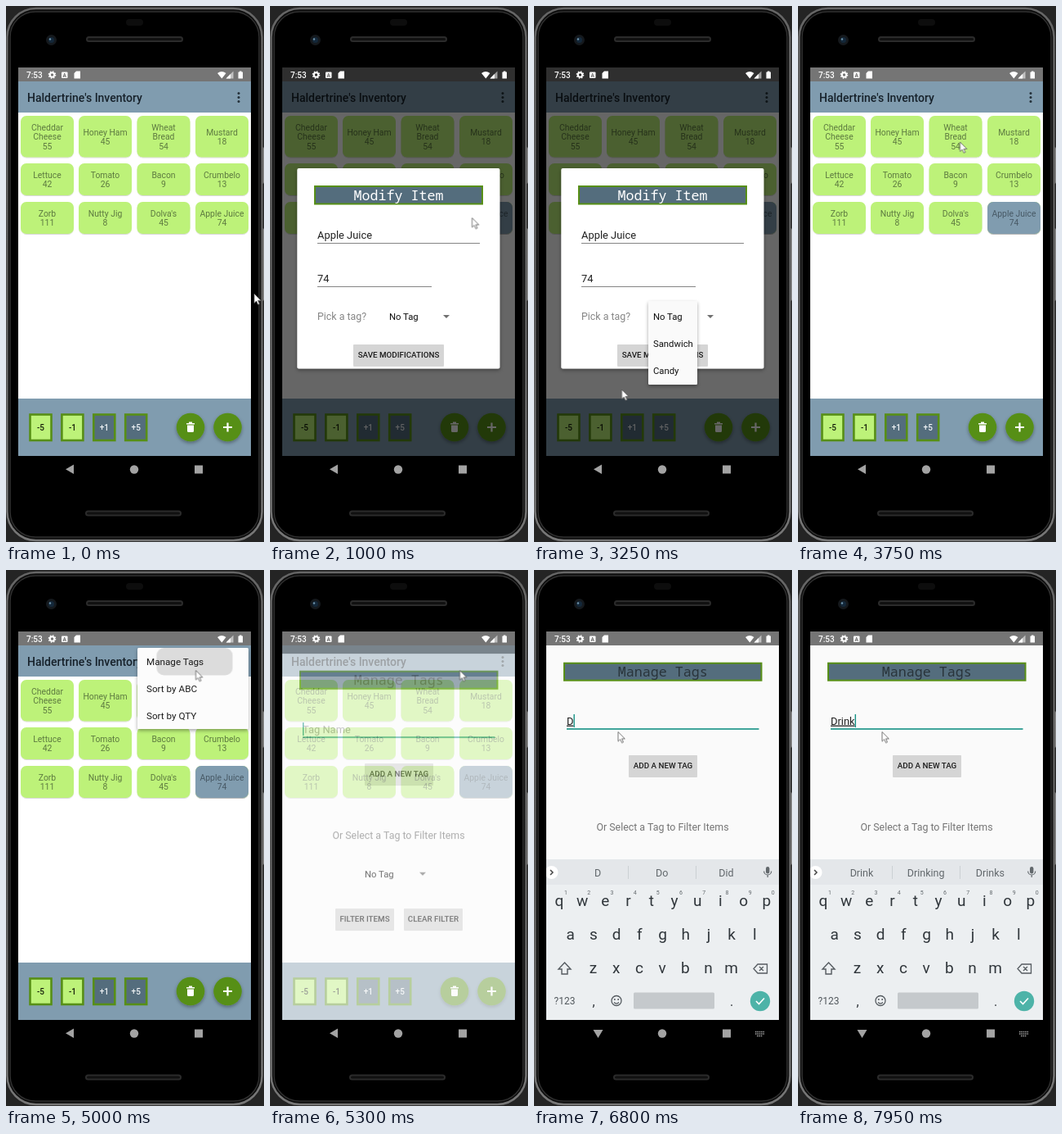
These frames come from a looping animation (316x654 px, 8 s). An HTML page:

```html
<!DOCTYPE html>
<html lang="en">
<head>
<meta charset="utf-8">
<title>Inventory app</title>
<style>
html, body { margin: 0; width: 100%; height: 100%; overflow: hidden; background: #242424; }
svg { display: block; width: 316px; height: 654px; font-family: Roboto, sans-serif; }
.mono { font-family: "Noto Sans Mono", monospace; }
.loop { animation: 8s linear infinite both; }
.step { animation: 8s step-end infinite both; }
#pointer { animation-name: pointer; animation-timing-function: ease-in-out; }
#selected { animation-name: selected; }
#dim, #dialog { animation-name: dialog; }
#dropdown { animation-name: dropdown; }
#menu { animation-name: menu; transform-origin: 297px 95px; }
#ripple { animation-name: ripple; transform-origin: 231px 112px; }
#page { animation-name: page; }
#keyboard { animation-name: keyboard; }
#navShade { animation-name: navShade; }
#navBack { animation-name: navBack; }
#navDown { animation-name: navDown; }
@keyframes pointer {
  0%, .6% { transform: translate(304px, 351px); }
  5% { transform: translate(258px, 262px); }
  10%, 13.75% { transform: translate(247.5px, 258.5px); }
  18.75%, 23.75% { transform: translate(192px, 376px); }
  31.8%, 42.5% { transform: translate(107.5px, 468px); }
  46.8%, 47.5% { transform: translate(198.5px, 166px); }
  53.75%, 58% { transform: translate(285px, 108px); }
  61.25%, 66.25% { transform: translate(232.500px, 122.500px); }
  71.25%, 100% { transform: translate(103px, 197.500px); }
}
@keyframes selected { 0% { opacity: 0; } 6.25%, 100% { opacity: 1; } }
@keyframes dialog { 0%, 10.2% { opacity: 0; } 12%, 43.4% { opacity: 1; } 45%, 100% { opacity: 0; } }
@keyframes dropdown { 0%, 22% { opacity: 0; } 23.5%, 40.8% { opacity: 1; } 41.9%, 100% { opacity: 0; } }
@keyframes menu {
  0%, 55% { opacity: 0; transform: scale(.6, .3); }
  57%, 63.75% { opacity: 1; transform: none; }
  65%, 100% { opacity: 0; transform: none; }
}
@keyframes ripple {
  0%, 61.8% { opacity: 0; transform: scaleX(.2); }
  61.9% { opacity: 1; transform: scaleX(.3); }
  62.5% { opacity: 1; transform: none; }
  63.2%, 100% { opacity: 1; transform: scaleX(1.7); }
}
@keyframes page {
  0%, 65% { opacity: 0; transform: translateY(25px); animation-timing-function: ease-out; }
  68%, 100% { opacity: 1; transform: none; }
}
@keyframes keyboard {
  0%, 74.24% { opacity: 0; transform: translateY(20px); }
  74.25% { opacity: .82; transform: translateY(20px); animation-timing-function: ease-out; }
  76.75%, 100% { opacity: 1; transform: none; }
}
@keyframes navShade { 0%, 74.24% { opacity: 1; } 74.25% { opacity: .27; } 76.75%, 100% { opacity: 1; } }
@keyframes navBack { 0% { opacity: 1; } 74.25%, 100% { opacity: 0; } }
@keyframes navDown { 0% { opacity: 0; } 74.25%, 100% { opacity: 1; } }
</style>
</head>
<body>
<svg id="stage" viewBox="0 0 316 654"></svg>
<script>
const LIME = '#bdf279', GREEN = '#578f16', STEEL = '#809caf', SLATE = '#546d7d', TEAL = '#159184';

const text = (x, y, str, size, fill, more = '') =>
  `<text x="${x}" y="${y + size * .355}" font-size="${size}" fill="${fill}" ${more}>${str}</text>`;
const MID = 'text-anchor="middle"', BOLD = 'font-weight="500"';
const centered = (x, y, str, size, fill, more = '') => text(x, y, str, size, fill, `${MID} ${more}`);
const box = (x, y, w, h, fill, more = '') =>
  `<rect x="${x}" y="${y}" width="${w}" height="${h}" fill="${fill}" ${more}/>`;
const path = (d, fill, more = '') => `<path d="${d}" fill="${fill}" ${more}/>`;
const line = (d, color, width = 1, more = '') => path(d, 'none', `stroke="${color}" stroke-width="${width}" ${more}`);
const dot = (x, y, r, fill, more = '') => `<circle cx="${x}" cy="${y}" r="${r}" fill="${fill}" ${more}/>`;
const layer = (id, body, kind = 'loop') => `<g id="${id}" class="${kind}">${body}</g>`;
const caret = (x, y) => path(`M${x - 4} ${y - 2}h8l-4 4z`, '#707070');
const banner = (x, y, w, h, str, fill) =>
  box(x + 1, y + 1, w - 2, h - 2, SLATE, `stroke="${GREEN}" stroke-width="2"`) +
  centered(x + w / 2, y + h / 2 + .3, str, 16.7, fill, 'class="mono"');
const button = (x, y, w, h, str) =>
  box(x, y, w, h, '#d5d5d5', 'rx="1" filter="url(#soft)"') +
  centered(x + w / 2, y + h / 2, str, 9.8, '#1c1c1c', BOLD);

// Phone body
function phone() {
  return box(0, 0, 316, 654, '#242424') +
    box(311, 172, 5, 45, '#858585', 'rx="2"') + box(311, 271, 5, 89, '#858585', 'rx="2"') +
    box(1.5, 3, 312, 649, '#0c0c0c', 'rx="35" stroke="url(#rim)" stroke-width="2.5"') +
    box(5, 7, 305, 641, '#000', 'rx="31" stroke="#303030" stroke-width="1.5"') +
    box(147, 16, 21, 8, '#0d0d0d', 'rx="4"') +
    dot(55.5, 41.5, 6.5, '#15191d') + dot(55.5, 41.5, 3.5, '#14283a') + dot(54, 40.5, 1.2, '#6f93a8') +
    box(98, 37, 119, 7, '#2b2b2b', 'rx="3.5"') + box(100, 39, 115, 3, '#111', 'rx="1.5"') +
    box(97, 615.5, 118, 7, '#2b2b2b', 'rx="3.5"') + box(99, 617.5, 114, 3, '#111', 'rx="1.5"');
}

// Inventory grid
const columns = [18, 89, 160.5, 232];
const rows = [[134, 50.5], [192, 39], [239, 39]];
const items = [
  ['Cheddar', 'Cheese', 55], ['Honey Ham', 45], ['Wheat', 'Bread', 54], ['Mustard', 18],
  ['Lettuce', 42], ['Tomato', 26], ['Bacon', 9], ['Crumbelo', 13],
  ['Zorb', 111], ['Nutty Jig', 8], ["Dolva's", 45], ['Apple Juice', 74]
];
function cell(lines, i, fill, ink) {
  const x = columns[i % 4], [y, h] = rows[i >> 2];
  const top = y + h / 2 - (lines.length - 1) * 5.7 + .3;
  return box(x, y, 65, h, fill, 'rx="7" filter="url(#soft)"') +
    lines.map((s, k) => centered(x + 32.5, top + k * 11.4, s, 10.4, ink)).join('');
}
function inventory() {
  const steps = ['-5', '-1', '+1', '+5'].map((label, i) => {
    const light = i < 2;
    return box(29.5 + i * 38.9, 498.5, 26, 31.5, light ? LIME : SLATE, `stroke="${GREEN}" stroke-width="2.6"`) +
      centered(42.5 + i * 38.9, 514.5, label, 10, light ? '#16200a' : '#eef2f4', BOLD);
  }).join('');
  const fabs = [226, 271.5].map(x => dot(x, 514, 17.3, GREEN, 'filter="url(#shadow)"')).join('');
  return box(15, 75, 285, 474, '#fff') + box(15, 75, 285, 17, '#757575') + box(15, 92, 285, 38, STEEL) +
    text(26, 112, "Haldertrine's Inventory", 14, '#16212a', BOLD) +
    [106.5, 111.5, 116.5].map(y => dot(285, y, 1.5, '#24313a')).join('') +
    items.map((item, i) => cell(item, i, LIME, '#5d7a40')).join('') +
    layer('selected', cell(items[11], 11, STEEL, '#475965'), 'step') +
    box(15, 479, 285, 70, STEEL) + steps + fabs +
    path('M221 509h10v1.6h-10zM224 507.5h4v2h-4zM222 511.5h8v7q0 1.5-1.5 1.5h-5q-1.5 0-1.5-1.5z', '#fff') +
    line('M271.5 508.5v11M266 514h11', '#fff', 2.2);
}

function dialog() {
  return box(33.3, 198, 248.2, 244.5, '#fff', 'rx="2" filter="url(#shadow)"') +
    banner(54, 219, 207, 23.5, 'Modify Item', '#fff') +
    text(58, 279.5, 'Apple Juice', 12.9, '#222') + line('M58 289.5h199', '#858585') +
    text(58, 332.5, '74', 12.9, '#222') + line('M58 342.5h140', '#858585') +
    text(58, 379, 'Pick a tag?', 12.4, '#858585') +
    text(146, 379, 'No Tag', 11.3, '#111') + caret(216, 379) +
    button(102, 413, 111, 26, 'SAVE MODIFICATIONS');
}
function dropdown() {
  return box(140, 360, 60, 102, '#fafafa', 'rx="1.5" filter="url(#shadow)"') +
    ['No Tag', 'Sandwich', 'Candy'].map((s, i) => text(146, 379 + i * 33.2, s, 11.3, '#111')).join('');
}
function menu() {
  return box(161, 95, 136, 99, '#fcfcfc', 'rx="1.5" filter="url(#shadow)"') +
    `<g clip-path="url(#firstItem)">${layer('ripple', box(185, 95, 92, 33.5, '#dcdcdc', 'rx="9"'))}</g>` +
    ['Manage Tags', 'Sort by ABC', 'Sort by QTY'].map((s, i) => text(172, 111.7 + i * 33.2, s, 11.7, '#1c1c1c')).join('');
}

// Typed word with the suggestions that go with it
const typing = [
  [0, '', 'thanks', 'I', 'we'],
  [6550, 'D', 'D', 'Do', 'Did'],
  [6850, 'Dr', 'Dr', 'Drive', 'Dr.'],
  [7100, 'Dri', 'Dri', 'Drive', 'Drink'],
  [7400, 'Drin', 'Drin', 'Drink', 'Drinking'],
  [7700, 'Drink', 'Drink', 'Drinking', 'Drinks']
];
const staged = draw => typing.map((stage, i) =>
  `<g class="step" style="animation-name:stage${i}">${draw(stage)}</g>`).join('');

function page() {
  return box(15, 75, 285, 474, '#fafafa') + box(15, 75, 285, 17, '#757575') +
    banner(36, 112.7, 243.5, 23, 'Manage Tags', '#29343b') +
    staged(([, word]) => (word
      ? text(40, 184, word, 12.9, '#222', 'class="typed" text-decoration="underline"')
      : text(40, 184, 'Tag Name', 12.9, '#9a9a9a')) +
      box(40, 176, 1.4, 16, TEAL, 'class="bar"')) +
    box(40, 193.2, 235.5, 1.6, TEAL) +
    button(116, 226, 84, 26, 'ADD A NEW TAG') +
    centered(157.5, 314, 'Or Select a Tag to Filter Items', 12.4, '#757575') +
    text(116, 360.7, 'No Tag', 11.3, '#111') + caret(187, 360.7) +
    button(80, 403, 72, 26, 'FILTER ITEMS') + button(164, 403, 72, 26, 'CLEAR FILTER');
}

function keyboard() {
  const ink = '#30363b';
  const keys = (letters, x, y) => [...letters].map((c, i) => centered(x + i * 28.2, y, c, 19, ink)).join('');
  const digits = [...'1234567890'].map((d, i) => centered(39 + i * 28.2, 394, d, 7, '#62686c')).join('');
  return box(15, 353, 285, 196, '#eceff1') + box(15, 353, 285, 31, '#e4e7ea') +
    dot(21.5, 369, 8, '#fff') + line('M20 366l3 3-3 3', '#444', 1.5) +
    line('M115.5 361v16M198.5 361v16', '#cbd0d3') +
    staged(([, , ...words]) => words.map((w, i) => centered(78 + i * 78.7, 369.5, w, 12.5, '#62686c')).join('')) +
    box(284, 362, 4.4, 8.5, '#62686c', 'rx="2.2"') + line('M281.7 367.5a4.5 4.5 0 0 0 9 0M286.2 372v3', '#62686c', 1.2) +
    keys('qwertyuiop', 31, 403.5) + digits + keys('asdfghjkl', 44.7, 444) + keys('zxcvbnm', 72.5, 485) +
    line('M37.5 479l7.5 8h-4v6h-7v-6h-4z', '#555b60', 1.4) +
    line('M274 481h11.5v11h-11.5l-5-5.5zM276 484l5 5m0-5l-5 5', '#555b60', 1.3) +
    centered(37.5, 525.5, '?123', 12, '#50565b') + centered(73, 526, ',', 16, ink) + centered(242, 526, '.', 16, ink) +
    dot(101, 525.5, 6, 'none', 'stroke="#555b60" stroke-width="1.3"') +
    dot(98.8, 524, 1, '#555b60') + dot(103.2, 524, 1, '#555b60') + line('M98 527.5q3 3 6 0', '#555b60', 1.2) +
    box(122, 515.5, 99, 20, '#c5c9cc', 'rx="1.5"') +
    dot(277, 526, 12.2, '#4db3a8') + line('M272 526l3.5 3.5 6.5-7', '#fff', 1.6);
}

function statusIcons() {
  return text(25, 84.2, '7:53', 10, '#fff', BOLD) +
    dot(56.5, 84, 2.7, 'none', 'stroke="#fff" stroke-width="2"') +
    dot(56.5, 84, 4.2, 'none', 'stroke="#fff" stroke-width="1.2" stroke-dasharray="1.6 1.7"') +
    box(68, 80.5, 7.5, 7.5, '#fff', 'rx="1"') + centered(71.8, 84.4, 'A', 6.5, '#666', 'font-weight="700"') +
    path('M86 79.5h5v9h-7.5v-6.5z', '#fff') +
    path('M259 82q5-4 10.5 0l-5.2 6.5z', '#fff') + path('M278.5 79.5v9h-9z', '#fff', 'fill-opacity=".55"') +
    path('M275 83v5.5h-5.5z', '#fff') +
    path('M284.5 80.5h1.5v-1h2.5v1h1.5v8h-5.5z', '#fff');
}

function navigation() {
  const gray = '#a3a3a3';
  return layer('navShade', box(15, 549, 285, 32, '#000')) +
    layer('navBack', path('M83 559.5v11.5l-10-5.7z', gray), 'step') +
    layer('navDown', path('M72.5 561h12l-6 10z', gray) +
      line('M271 563.5h11M271 566h11M273 568.5h7', gray, 1.3, 'stroke-dasharray="1.5 .9"'), 'step') +
    dot(157, 565.5, 5.2, gray) + box(231, 560.5, 10, 10, gray);
}

const defs = `<defs>
  <linearGradient id="rim" x2="0" y2="1"><stop stop-color="#666"/><stop offset=".5" stop-color="#5c5c5c"/><stop offset="1" stop-color="#777"/></linearGradient>
  <filter id="soft"><feDropShadow dx="0" dy=".7" stdDeviation=".7" flood-opacity=".22"/></filter>
  <filter id="shadow" x="-20%" y="-20%" width="140%" height="150%"><feDropShadow dx="0" dy="2" stdDeviation="2" flood-opacity=".35"/></filter>
  <clipPath id="firstItem"><rect x="161" y="95" width="136" height="33.5"/></clipPath>
  <clipPath id="screen"><rect x="15" y="75" width="285" height="474"/></clipPath>
  <clipPath id="display"><rect x="15" y="75" width="285" height="492.500"/></clipPath>
</defs>`;

const stage = document.getElementById('stage');
stage.innerHTML = defs + phone() + inventory() +
  layer('dim', box(15, 75, 285, 474, '#000', 'fill-opacity=".6"')) +
  layer('dialog', dialog()) + layer('dropdown', dropdown()) + layer('menu', menu()) +
  `<g clip-path="url(#screen)">${layer('page', page())}</g>` +
  `<g clip-path="url(#display)">${layer('keyboard', keyboard())}</g>` +
  statusIcons() + navigation() +
  layer('pointer', path('M0 0v11.5l2.7-2.4 1.9 4.2 1.9-.8-1.9-4.1h3.7z', '#fff', 'stroke="#555" stroke-width=".8"'));

// Put the text bar after each typed word
for (const word of stage.querySelectorAll('.typed'))
  word.parentNode.querySelector('.bar').setAttribute('x', 40 + word.getComputedTextLength());

const rules = document.createElement('style');
rules.textContent = typing.map(([start], i) => {
  const end = typing[i + 1]?.[0] ?? 8000;
  const before = start ? '0% { opacity: 0; }' : '';
  const after = end < 8000 ? `${end / 80}%, 100% { opacity: 0; }` : '100% { opacity: 1; }';
  return `@keyframes stage${i} { ${before} ${start / 80}% { opacity: 1; } ${after} }`;
}).join('\n');
document.head.append(rules);
</script>
</body>
</html>
```
